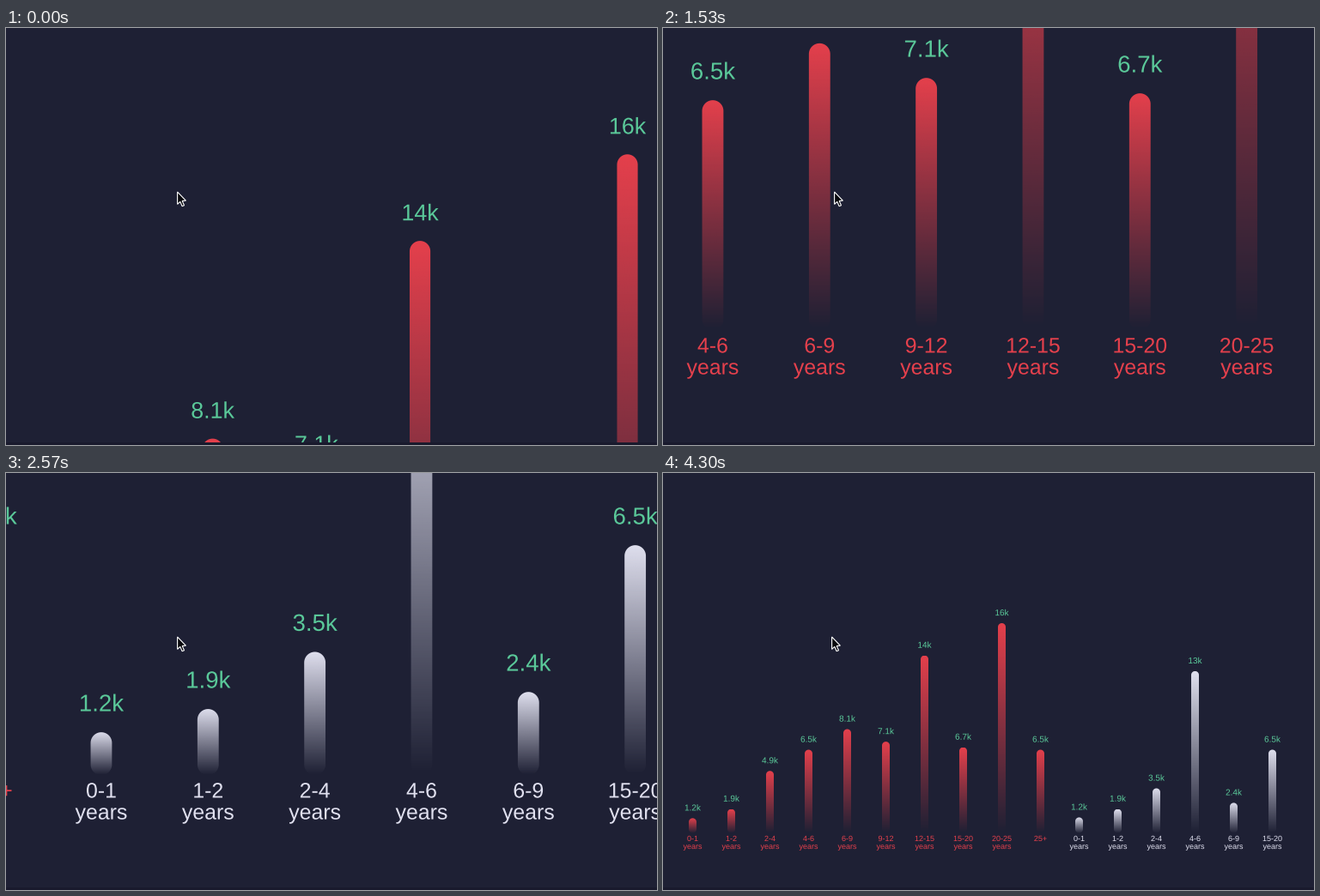
Recreate the animation shown at these times as a matplotlib script. Size 758x486 px, loop 4330 ms.

```python
import matplotlib.pyplot as plt
import numpy as np
from matplotlib.animation import FuncAnimation
from matplotlib.patches import PathPatch, Polygon, Rectangle
from matplotlib.path import Path
from matplotlib.textpath import TextPath
from matplotlib.transforms import Affine2D

WIDTH, HEIGHT, DPI = 758, 486, 100
LOOP_MS, FRAMES = 4330, 130

BACKGROUND = "#1e2034"
STRIP = "#191a2d"
RED = "#e5404c"
PALE = "#e0e0ef"
GREEN = "#5ac899"
FONT = {"family": "Liberation Sans"}

# Chart geometry at scale 1
FIRST_X, STEP, RADIUS, FLOOR = 34.5, 45, 4.5, 419.5
RED_BARS = [
    ("0-1", "1.2k", 402.3), ("1-2", "1.9k", 391.6), ("2-4", "4.9k", 347.2),
    ("4-6", "6.5k", 322.5), ("6-9", "8.1k", 298.5), ("9-12", "7.1k", 313.1),
    ("12-15", "14k", 212.6), ("15-20", "6.7k", 319.6), ("20-25", "16k", 175.0),
    ("25+", "6.5k", 322.5),
]
PALE_BARS = [
    ("0-1", "1.2k", 401.4), ("1-2", "1.9k", 391.6), ("2-4", "3.5k", 367.5),
    ("4-6", "13k", 230.9), ("6-9", "2.4k", 384.4), ("15-20", "6.5k", 322.5),
]

# Motion keys: (ms, value)
FOCUS_X, FOCUS_Y, ZOOM = 199, 191.5, 2.763
SCALE_KEYS = [(-80, 2.6), (0, 2.683), (120, ZOOM), (3740, ZOOM),
              (4000, 1.8), (4240, 1)]
PAN_X_KEYS = [(1270, 0), (1500, -60), (1770, -290), (2170, -723),
              (2570, -877.6), (2670, -885.5), (2900, -889.5)]
PAN_Y_KEYS = [(200, 0), (530, -140), (800, -350), (1085, -441), (1230, -467.2),
              (1330, -469.3), (2990, -469.3), (3200, -369), (3330, -231),
              (3500, -130), (3700, -94.3)]
CURSOR_KEYS = [(3740, 0), (3850, -3)]


def glide(t, keys):
    """Smooth monotone interpolation through the keys."""
    times, values = np.array(keys, float).T
    if t <= times[0]:
        return values[0]
    if t >= times[-1]:
        return values[-1]
    gaps = np.diff(times)
    rates = np.diff(values) / gaps
    slopes = np.zeros(len(times))
    for i in range(1, len(rates)):
        a, b = rates[i - 1], rates[i]
        if a * b > 0:
            slopes[i] = 2 * a * b / (a + b)
    i = np.searchsorted(times, t, side="right") - 1
    u = (t - times[i]) / gaps[i]
    rise = u * u * (3 - 2 * u)
    bend = gaps[i] * u * (1 - u) * (slopes[i] * (1 - u) - slopes[i + 1] * u)
    return values[i] + (values[i + 1] - values[i]) * rise + bend


def centered_text(text, x, baseline, size):
    glyphs = TextPath((0, 0), text, size=size, prop=FONT)
    bar = TextPath((0, 0), "|", size=size, prop=FONT)
    with_bar = TextPath((0, 0), text + "|", size=size, prop=FONT)
    advance = with_bar.get_extents().x1 - bar.get_extents().x1
    place = Affine2D().scale(1, -1).translate(x - advance / 2, baseline)
    return place.transform_path(glyphs)


def capsule(x, top):
    angle = np.linspace(0, 2 * np.pi, 65)
    center = np.where(np.sin(angle) >= 0, top + RADIUS, FLOOR - RADIUS)
    points = np.column_stack([x + RADIUS * np.cos(angle),
                              center - RADIUS * np.sin(angle)])
    return Path(points, closed=True)


def fade(color):
    rgba = np.empty((128, 2, 4))
    rgba[..., :3] = plt.matplotlib.colors.to_rgb(color)
    rgba[..., 3] = np.linspace(1, 0, 128)[:, None]
    return rgba


fig = plt.figure(figsize=(WIDTH / DPI, HEIGHT / DPI), dpi=DPI,
                 facecolor=BACKGROUND)
ax = fig.add_axes([0, 0, 1, 1])
view = Affine2D()
chart = view + ax.transData


def add_text(paths, color):
    ax.add_artist(PathPatch(Path.make_compound_path(*paths), facecolor=color,
                            linewidth=0, transform=chart, snap=False, zorder=3))


def add_group(bars, color, first):
    labels, values = [], []
    for i, (age, value, top) in enumerate(bars, first):
        x = FIRST_X + STEP * i
        image = ax.imshow(fade(color), extent=(x - 7, x + 7, FLOOR, top),
                          origin="upper", aspect="auto", transform=chart,
                          interpolation="bilinear", zorder=2)
        image.set_clip_path(capsule(x, top), chart)
        values.append(centered_text(value, x, top - 8.9, 10))
        labels.append(centered_text(age, x, 429, 9))
        if not age.endswith("+"):
            labels.append(centered_text("years", x, 438.1, 9))
    add_text(labels, color)
    add_text(values, GREEN)


add_group(RED_BARS, RED, 0)
add_group(PALE_BARS, PALE, len(RED_BARS))
ax.add_artist(Rectangle((0, 483), WIDTH, 3, facecolor=STRIP, linewidth=0,
                        zorder=4))

ARROW = np.array([(199.6, 191), (199.6, 205.4), (202.8, 202.4), (205.1, 207.7),
                  (207.5, 206.7), (205.2, 201.5), (209.4, 201.2)])
cursor = Polygon(ARROW, facecolor="#08080c", edgecolor="white", linewidth=0.8,
                 joinstyle="miter", snap=False, zorder=5)
ax.add_artist(cursor)

ax.set_xlim(0, WIDTH)
ax.set_ylim(HEIGHT, 0)
ax.axis("off")


def offset(focus, pan, scale, size):
    """Zoom about the focus, keeping the chart's edges outside the stage."""
    zoomed = focus * (1 - ZOOM) + pan
    shift = focus - (focus - zoomed) * scale / ZOOM
    return min(0, max(size * (1 - scale), shift))


def update(frame):
    t = frame * LOOP_MS / FRAMES
    scale = glide(t, SCALE_KEYS)
    view.clear().scale(scale).translate(
        offset(FOCUS_X, glide(t, PAN_X_KEYS), scale, WIDTH),
        offset(FOCUS_Y, glide(t, PAN_Y_KEYS), scale, HEIGHT))
    cursor.set_xy(ARROW + (glide(t, CURSOR_KEYS), 0))
    return []


animation = FuncAnimation(fig, update, frames=FRAMES,
                          interval=LOOP_MS / FRAMES, repeat=True,
                          repeat_delay=0, blit=False)
plt.show()
```
